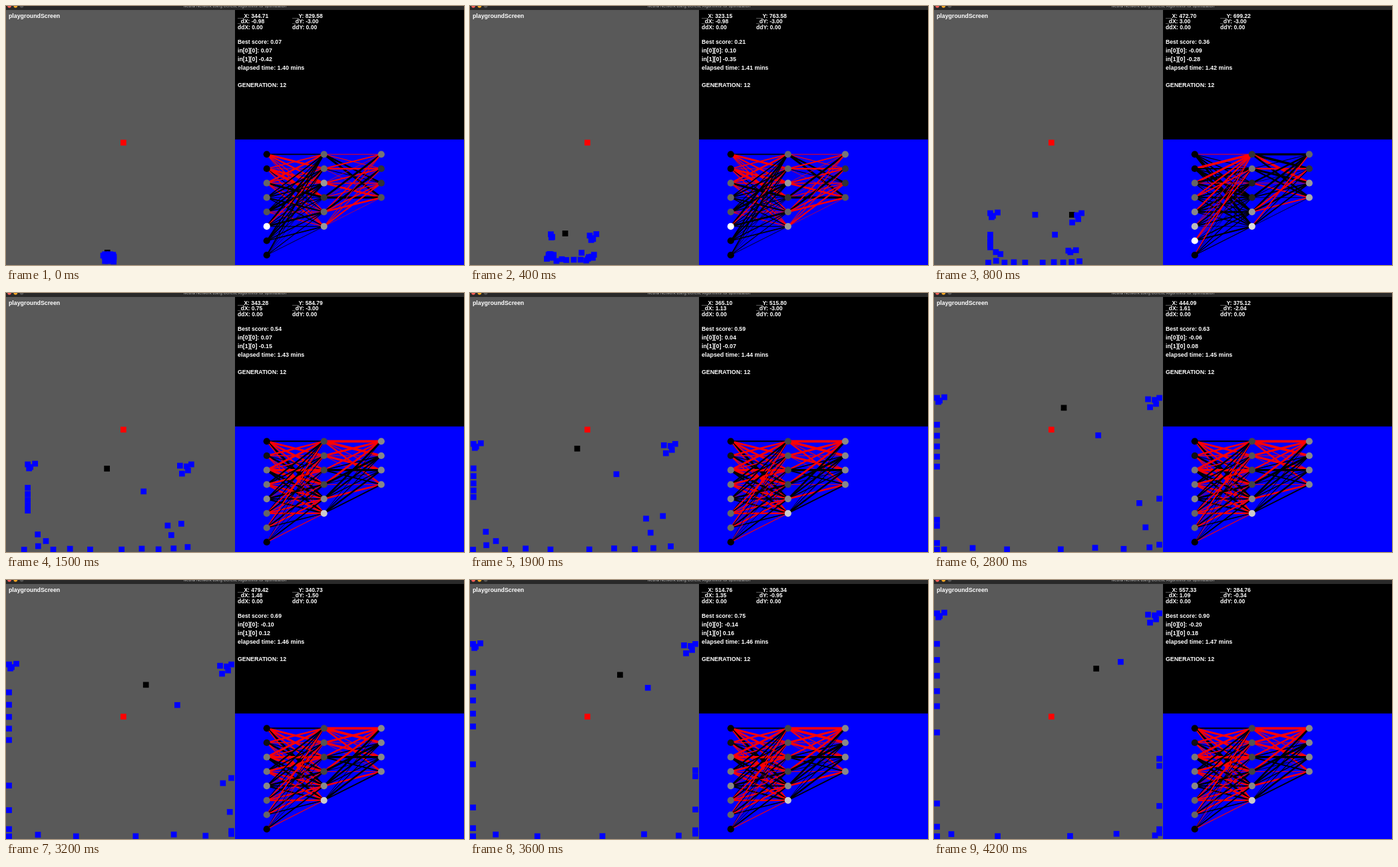
An HTML page with a canvas for the animation above (4300 ms loop, 688 px wide and 390 px high).

```html
<!DOCTYPE html>
<html>
<head>
<meta charset="utf-8">
<style>
html, body { margin: 0; width: 100%; height: 100%; overflow: hidden; background: #000; }
canvas { display: block; }
</style>
</head>
<body>
<canvas id="stage" width="688" height="390"></canvas>
<script>
const ctx = document.getElementById('stage').getContext('2d');
const RED = '#f00', BLUE = '#00f', BLACK = '#000';
const START = { x: 150, y: 373.5 };
const TICKS = 5.5; // simulation ticks per 100 ms step

const mix = (a, b, k) => a + (b - a) * k;
const clamp = (v, lo, hi) => Math.max(lo, Math.min(hi, v));
const noise = n => {
  const v = Math.sin(n * 12.9898) * 43758.5453;
  return v - Math.floor(v);
};

// Key states of the best agent in the 800 x 900 world
const KEYS = [
  { t: 0, x: 344.71, y: 829.58, dx: -.98, dy: -3, score: .07 },
  { t: 8, x: 472.7, y: 699.22, dx: 3, dy: -3, score: .36 },
  { t: 15, x: 343.28, y: 584.79, dx: .75, dy: -3, score: .54 },
  { t: 19, x: 365.1, y: 515.8, dx: 1.13, dy: -3, score: .59 },
  { t: 28, x: 444.09, y: 375.12, dx: 1.61, dy: -2.04, score: .63 },
  { t: 36, x: 514.76, y: 306.34, dx: 1.35, dy: -.95, score: .75 },
  { t: 42, x: 557.33, y: 284.76, dx: 1.09, dy: -.34, score: .9 }
];

const phaseAt = t => t < 5 ? 0 : t < 12 ? 1 : 2;
const toStage = ({ x, y }) => ({ x: (x + 10) * .43 - .3, y: y * .4367 + 9 });

function blend(a, b, t) {
  const k = (t - a.t) / (b.t - a.t), out = {};
  for (const name in a) out[name] = mix(a[name], b[name], k);
  return out;
}

function bestAt(t) {
  const n = Math.max(1, KEYS.findIndex(key => t <= key.t));
  const state = blend(KEYS[n - 1], KEYS[n], t);
  if (t >= 15) return state;
  const key = KEYS[phaseAt(t)], ticks = TICKS * (t - key.t);
  return { ...key, x: key.x + key.dx * ticks, y: key.y + key.dy * ticks, score: state.score };
}

// Agents slow down sideways, start to climb after a delay, and stop at the walls
const agents = [];
function addAgent(vx, vy, delay = 0, offset = [0, 0]) {
  agents.push({ vx, vy, delay, offset, id: agents.length });
}

const RIVAL = 0;
for (const offset of [[-17, 2], [0, 0], [-7, 3], [-5, 9], [-14, 14]]) addAgent(9.4, -7.7, 0, offset);
for (const offset of [[0, 0], [4, 4], [11, -1], [2, 6]]) addAgent(-8.6, -7.7, 0, offset);
for (let i = 0; i < 5; i++) addAgent(-8.6, -7.3 + .55 * i, 4 + i / 2);
for (let i = 0; i < 10; i++) {
  const u = (i - 4.5) / 4.5;
  addAgent(Math.sign(u) * 9 * Math.abs(u) ** .75, -.5 * noise(i) * Math.abs(u), 0, [0, 13]);
}
addAgent(4.15, -6.5, 3.5);
addAgent(6.8, -2.6, 6);
addAgent(8.3, -2.9, 6);
addAgent(7.2, -.9, 5);
addAgent(-6.6, -8, 24);
addAgent(-7.5, -1, 5);

function agentAt({ vx, vy, delay, offset, id }, t) {
  const spread = Math.max(0, 1 - t / 8);
  const x = START.x + vx * t * (1 - .006 * t);
  return {
    x: clamp(x, 4.5, 338.5) + mix(offset[0], 16 * noise(id + 5) - 4, spread),
    y: START.y + vy * Math.max(0, t - delay) + mix(offset[1], 13 * noise(id + 50), spread)
  };
}

function rect(color, x, y, w, h) {
  ctx.fillStyle = color;
  ctx.fillRect(x, y, w, h);
}

function square(color, { x, y }) {
  rect(color, x - 4.3, y - 4.3, 8.7, 8.7);
}

function dot(color, x, y, r) {
  ctx.fillStyle = color;
  ctx.beginPath();
  ctx.arc(x, y, r, 0, 7);
  ctx.fill();
}

function text(str, x, y, size = 8.8) {
  ctx.font = `bold ${size}px "Liberation Sans", Arial, sans-serif`;
  ctx.fillStyle = '#fff';
  ctx.fillText(str, x, y);
}

function playground(t, best) {
  rect('#595959', 0, 6, 344, 384);
  const rivalLeads = phaseAt(t) === 1;
  square(BLACK, toStage(best));
  if (rivalLeads) square(BLUE, toStage(blend(KEYS[0], KEYS[2], t)));
  for (const agent of agents) {
    if (agent.id !== RIVAL || !rivalLeads) square(BLUE, agentAt(agent, t));
  }
  square(RED, { x: 176.3, y: 205.7 });
  text('playgroundScreen', 4, 17.5);
}

function readout(t, { x, y, dx, dy, score }) {
  const f = v => v.toFixed(2);
  rect(BLACK, 344, 6, 344, 195);
  [['X', 348, x, dx], ['Y', 430, y, dy]].forEach(([axis, left, pos, vel]) => {
    text(`__${axis}: ${f(pos)}`, left, 17.5, 8.5);
    text(`_d${axis}: ${f(vel)}`, left, 26, 8.5);
    text(`dd${axis}: 0.00`, left, 35, 8.5);
  });
  text('Best score: ' + f(score), 348, 56.5, 8.6);
  text('in[0][0]: ' + f((400 - x) / 800), 348, 69.5);
  text('in[1][0] ' + f((450 - y) / 900), 348, 82.5);
  text(`elapsed time: ${f(1.4045 + .00163 * t)} mins`, 348, 95.5, 8.95);
  text('GENERATION: 12', 348, 121.5);
}

// One hex grey per node; "red" gives the lean to red weights for link i -> j
const NETS = [
  { shades: ['00665f00', '669369', '7335'], red: [i => .9 - .3 * i, i => .5] },
  { shades: ['00668bf0', '37229d', '639a'], red: [(i, j) => .5 - .35 * j, i => -.7] },
  { shades: ['01778660', '45448c', '8888'], red: [(i, j) => .6 - .06 * i - .15 * j, i => .7 - .3 * i] }
];

function network(t) {
  rect(BLUE, 344, 201, 344, 189);
  const phase = phaseAt(t), { shades, red } = NETS[phase];
  const nodeX = layer => 391.7 + 86 * layer, nodeY = i => 223.3 + 21.7 * i;
  red.forEach((lean, l) => {
    for (let i = 0; i < shades[l].length; i++) {
      for (let j = 0; j < shades[l + 1].length; j++) {
        const seed = 200 * phase + 100 * l + 8 * i + j;
        ctx.strokeStyle = 2 * noise(seed) - 1 + lean(i, j) > 0 ? RED : BLACK;
        ctx.lineWidth = (.8 + 3.2 * noise(seed + .5)) * (1 - i / 16);
        ctx.beginPath();
        ctx.moveTo(nodeX(l), nodeY(i));
        ctx.lineTo(nodeX(l + 1), nodeY(j));
        ctx.stroke();
      }
    }
  });
  shades.forEach((layer, l) => [...layer].forEach((d, i) => dot('#' + d + d + d, nodeX(l), nodeY(i), 5.1)));
}

function titleBar() {
  rect('#292929', 0, 0, 688, 6);
  ['#ff5f57', '#f5a623', '#555'].forEach((c, i) => dot(c, 5 + 9.3 * i, 0, 2.8));
  ctx.font = '5.7px Inter, sans-serif';
  ctx.fillStyle = '#bbb';
  ctx.textAlign = 'center';
  ctx.fillText('Neural Network using Genetic Algorithms for optimization', 344, 2.2);
  ctx.textAlign = 'left';
}

function draw() {
  const t = Math.floor(performance.now() % 4300 / 100);
  const best = bestAt(t);
  playground(t, best);
  readout(t, best);
  network(t);
  titleBar();
  requestAnimationFrame(draw);
}
draw();
</script>
</body>
</html>
```
